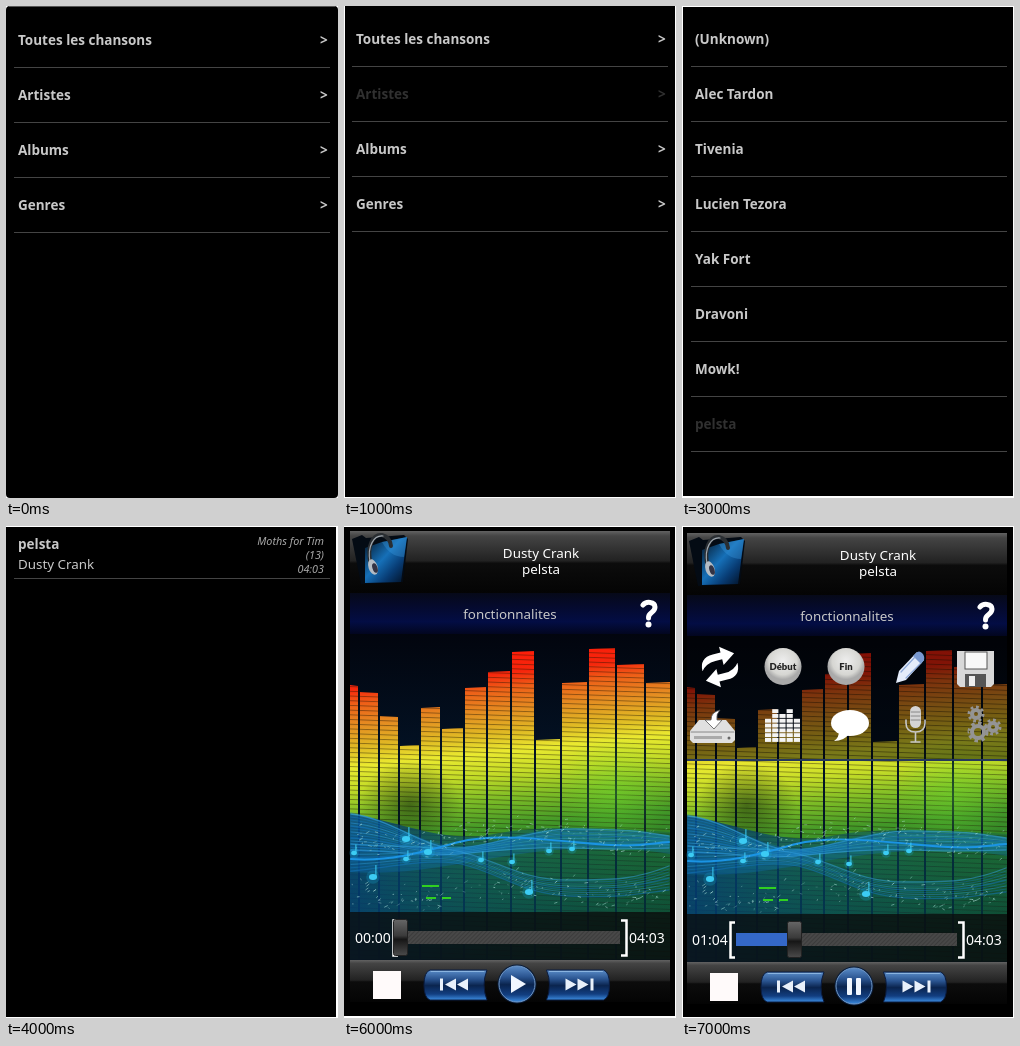
Write an HTML page that moves like this. It is 332 px wide and 492 px high and loops after 8000 ms.

```html
<!DOCTYPE html>
<html lang="fr">
<head>
<meta charset="utf-8">
<title>Lecteur audio</title>
<style>
html, body { margin: 0; width: 332px; height: 492px; overflow: hidden; background: #fff; }
svg { display: block; }
text { font: 13.4px "Noto Sans", "Open Sans", sans-serif; fill: #c8c8c8; white-space: pre; }
.b { font-weight: 700; font-size: 13.5px; }
.i { font-style: italic; font-size: 10.8px; text-anchor: end; fill: #a8a8a8; }
.w { fill: #fff; }
.t { fill: #fff; font-size: 14px; }
.m { text-anchor: middle; }
.k { font: 900 9.5px Lato, sans-serif; fill: #222; text-anchor: middle; }
.dim text { fill: #303030; }
.scene { visibility: hidden; animation: show 8s step-end infinite; }
@keyframes show { 0% { visibility: visible; } 12.5%, 100% { visibility: hidden; } }
</style>
</head>
<body>
<svg id="stage" width="332" height="492" viewBox="0 0 332 492">
  <defs>
    <linearGradient id="head" x2="0" y2="1">
      <stop stop-color="#626262"/><stop offset=".08" stop-color="#444"/><stop offset=".48" stop-color="#222"/>
      <stop offset=".52" stop-color="#0c0c0c"/><stop offset="1" stop-color="#040404"/>
    </linearGradient>
    <linearGradient id="navy" x2="0" y2="1">
      <stop stop-color="#060918"/><stop offset=".3" stop-color="#050a2c"/><stop offset=".7" stop-color="#030d44"/><stop offset="1" stop-color="#02061f"/>
    </linearGradient>
    <linearGradient id="sky" x2="0" y2="1">
      <stop stop-color="#02050e"/><stop offset=".4" stop-color="#031326"/><stop offset="1" stop-color="#04222a"/>
    </linearGradient>
    <linearGradient id="heat" gradientUnits="userSpaceOnUse" x1="150" y1="120" x2="182" y2="430">
      <stop stop-color="#ff1a08"/><stop offset=".09" stop-color="#f6260c"/><stop offset=".14" stop-color="#ee6018"/>
      <stop offset=".21" stop-color="#e48e22"/><stop offset=".28" stop-color="#e0ba24"/><stop offset=".34" stop-color="#eaea30"/>
      <stop offset=".41" stop-color="#c4dc28"/><stop offset=".49" stop-color="#7cbc26"/><stop offset=".58" stop-color="#429828"/>
      <stop offset=".7" stop-color="#267628"/><stop offset=".86" stop-color="#175a2c"/><stop offset="1" stop-color="#0e3c24"/>
    </linearGradient>
    <linearGradient id="deep">
      <stop stop-color="#043c74" stop-opacity=".85"/><stop offset=".4" stop-color="#04486c" stop-opacity=".55"/><stop offset="1" stop-color="#044c50" stop-opacity=".3"/>
    </linearGradient>
    <radialGradient id="smudge"><stop stop-color="#021408" stop-opacity=".5"/><stop offset="1" stop-color="#021408" stop-opacity="0"/></radialGradient>
    <radialGradient id="glow"><stop stop-color="#6be02c" stop-opacity=".35"/><stop offset="1" stop-color="#6be02c" stop-opacity="0"/></radialGradient>
    <linearGradient id="knob" x2="0" y2="1">
      <stop stop-color="#666"/><stop offset=".45" stop-color="#3a3a3a"/><stop offset=".55" stop-color="#161616"/><stop offset="1" stop-color="#4a4a4a"/>
    </linearGradient>
    <linearGradient id="btn" x2="0" y2="1">
      <stop stop-color="#5a8cc8"/><stop offset=".3" stop-color="#2a5490"/><stop offset=".52" stop-color="#0a244e"/><stop offset=".8" stop-color="#123e80"/><stop offset="1" stop-color="#3c8ce0"/>
    </linearGradient>
    <linearGradient id="folder" x2="1" y2="1"><stop stop-color="#04101e"/><stop offset=".45" stop-color="#1670b8"/><stop offset=".7" stop-color="#083c74"/><stop offset="1" stop-color="#020c1c"/></linearGradient>
    <radialGradient id="disc" cy=".35"><stop stop-color="#eee"/><stop offset=".75" stop-color="#d6d6d2"/><stop offset="1" stop-color="#aaa"/></radialGradient>
    <pattern id="lines" width="20" height="4.7" patternUnits="userSpaceOnUse" patternTransform="rotate(2)">
      <rect width="20" height="1" fill="#1c1400" opacity=".42"/>
    </pattern>
    <pattern id="hatch" width="3" height="3" patternUnits="userSpaceOnUse" patternTransform="rotate(45)">
      <rect width="3" height="3" fill="#484848"/><rect width="1" height="3" fill="#3c3c3c"/>
    </pattern>
  </defs>
</svg>
<script>
const ARTIST = 'pelsta', SONG = 'Dusty Crank';
const menu = ['Toutes les chansons', 'Artistes', 'Albums', 'Genres'];
const artists = ['(Unknown)', 'Alec Tardon', 'Tivenia', 'Lucien Tezora', 'Yak Fort', 'Dravoni', 'Mowk!', ARTIST];

const rect = (x, y, w, h, fill, more = '') => `<rect x="${x}" y="${y}" width="${w}" height="${h}" fill="${fill}" ${more}/>`;
const path = (d, more) => `<path d="${d}" ${more}/>`;
const circle = (x, y, r, fill, more = '') => `<circle cx="${x}" cy="${y}" r="${r}" fill="${fill}" ${more}/>`;
const ellipse = (x, y, rx, ry, fill, more = '') => `<ellipse cx="${x}" cy="${y}" rx="${rx}" ry="${ry}" fill="${fill}" ${more}/>`;
const text = (x, y, cls, s) => `<text x="${x}" y="${y}" class="${cls}">${s.replace('>', '&gt;')}</text>`;
const group = (s, more = '') => `<g ${more}>${s}</g>`;
const line = (c, w) => `fill="none" stroke="${c}" stroke-width="${w}" stroke-linecap="round" stroke-linejoin="round"`;
const range = n => [...Array(n).keys()];

function list(items, x, y, pressed, arrows) {
  return items.map((s, i) => group(
    text(x + 4, y + i * 55, 'b', s) + (arrows ? text(x + 306, y + i * 55, 'b', '>') : ''),
    i === pressed ? 'class="dim"' : '') + rect(x, y + 22 + i * 55, 316, 1, '#444')).join('');
}

function songRow(x, cls) {
  return group(text(x + 4, 23, 'b', ARTIST) + text(x + 4, 43, '', SONG) +
    ['Moths for Tim', '(13)', '04:03'].map((s, i) => text(x + 310, 19 + i * 14, 'i', s)).join(''), `class="${cls}"`) +
    rect(x, 52, 316, 1, '#444');
}

function random(seed) {
  return () => (seed = seed * 16807 % 2147483647) / 2147483647;
}

function waves() {
  const style = (i, n) => `${line(i % 3 ? '#1478c0' : '#34a4e4', i % 4 ? .8 : 1.3)} opacity="${n}"`;
  const upper = range(13).map(i => path(
    `M7 ${288 + i * 3}C50 ${293 + i * 2.6} 80 ${324 + i * .6} 115 ${322 + i * .5}S190 ${302 + i * 1.5} 235 ${303 + i * 1.6} 290 ${304 + i * 1.5} 325 ${310 + i}`,
    style(i, .6))).join('');
  const lower = range(9).map(i => path(
    `M7 ${318 + i * 3.4}C50 ${322 + i * 2.4} 90 ${318 + i * 1.5} 125 ${328 + i * 1.5}S180 ${354 + i * 1.7} 225 ${354 + i * 2} 290 ${354 + i * 1.8} 325 ${340 + i * 3}`,
    style(i, .5))).join('');
  return path('M6 286C50 294 80 322 120 320S180 300 235 303 295 306 326 310V328C250 316 190 326 150 332S60 350 6 346z', 'fill="#0f74bc" opacity=".3"') +
    upper + lower + path('M7 333C50 336 85 324 115 316S190 312 240 317 300 318 325 316', line('#1a94e4', 2));
}

function equalizer() {
  const rnd = random(77);
  const left = [6, 16, 36, 56, 77, 98, 121, 144, 168, 192, 218, 245, 273, 302, 328];
  const tops = [158, 165, 189, 219, 181, 202, 161, 145, 125, 213, 156, 122, 138, 156];
  const bars = tops.map((y, i) => {
    const w = Math.min(left[i + 1] - 2, 326) - left[i];
    const d = `M${left[i]} ${y + 1}l${w} ${i < 3 ? 1 : -1}V433h${-w}z`;
    return path(d, 'fill="url(#heat)"') + path(d, 'fill="url(#lines)"');
  }).join('');
  const specks = range(300).map(() => {
    const x = 8 + rnd() * 315, low = rnd() < .45;
    const y = (low ? 366 : 312) + 6 * Math.sin(x / 40) + (rnd() + rnd() - 1) * 18;
    return path(`M${x.toFixed(1)} ${y.toFixed(1)}l${(rnd() * 3).toFixed(1)} ${(rnd() * 3 - 2).toFixed(1)}`,
      `${line('#b4e8e0', .9)} opacity="${(.2 + rnd() * .5).toFixed(2)}"`);
  }).join('');
  const notes = [[29, 351], [10, 327], [62, 333], [84, 326], [137, 334], [168, 336], [185, 366], [205, 325], [228, 323], [62, 313]]
    .map(([x, y], i) => {
      const s = i % 3 ? 2.4 : 3.4;
      return circle(x, y, s * 2, '#20b8f0', 'opacity=".2"') + ellipse(x, y, s * 1.2, s * .9, '#3cccf4') +
        path(`M${x + s - .5} ${y}v${-s * 3.4}`, line('#3cccf4', 1));
    }).join('');
  return rect(6, 108, 320, 326, 'url(#sky)') + bars +
    ellipse(66, 278, 50, 44, 'url(#smudge)') + ellipse(270, 268, 56, 60, 'url(#glow)') +
    path('M6 288C60 296 100 318 150 308S270 302 326 306V434H6z', 'fill="url(#deep)"') +
    waves() + specks + notes +
    rect(78, 359, 17, 2, '#30d020') + rect(82, 371, 10, 2, '#30d020') + rect(98, 371, 9, 2, '#30d020');
}

function folderIcon() {
  return path('M8 13l10-4 4 3 38-3 4 4-5 43-42 2z', 'fill="#040b14"') +
    path('M21 22l17-6 25-5-6 45-36 1z', 'fill="url(#folder)"') +
    path('M38 16l25-5-3 20q-14 0-22-15z', 'fill="#3c9ce0" opacity=".35"') +
    path('M27 39C22 20 29 8 38 9Q46 11 47 20', line('#2a2e32', 4)) + path('M26 36C23 20 30 9 39 10', line('#a0a8b0', 1.2)) +
    ellipse(29, 41, 4.5, 8, '#b4bcc4', 'transform="rotate(-18 29 41)"') +
    ellipse(31, 42, 2.5, 5, '#334', 'transform="rotate(-18 31 42)"');
}

function skip(flip) {
  const d = 'M86 444H143Q137 459 143 474H86Q80 472 80 459T86 444z';
  const tri = x => `M${x} 458.500l11-6v12z`;
  return group(path(d, 'fill="url(#btn)" stroke="#0a1c40"') + path('M87 445.500H140', line('#8ab4e0', 1)) +
    rect(96, 452.500, 3, 12, '#e8f0fa') + path(tri(101) + tri(113), 'fill="#e8f0fa"'),
    flip ? 'transform="matrix(-1 0 0 1 345.500 0)"' : '');
}

function player(time, pos, playing) {
  const mark = playing
    ? rect(166, 450, 5, 17, '#f0f6ff', 'rx="1"') + rect(175, 450, 5, 17, '#f0f6ff', 'rx="1"')
    : path('M167 449l15 9-15 9z', 'fill="#f0f6ff"');
  return rect(6, 5, 320, 62, 'url(#head)') + folderIcon() +
    text(197, 32, 'w m', SONG) + text(197, 48, 'w m', ARTIST) +
    rect(6, 67, 320, 41, 'url(#navy)') + text(166, 93, 'm', 'fonctionnalites') +
    path('M299 79C302 75 311 75.500 311 81 311 87 304 86 304.500 92', line('#fff', 5)) + circle(304.500, 98.500, 3, '#fff') +
    equalizer() +
    rect(6, 386, 320, 48, '#0a0a0a', 'opacity=".75"') +
    text(11, 417, 't', time) + text(285, 417, 't', '04:03') +
    rect(55, 405, 221, 13, 'url(#hatch)') + rect(55, 405, Math.max(pos - 55, 0), 13, '#3468c8') +
    path('M54 394.500H49.500V429.500H54M277 394.500H282.500V429.500H277', 'fill="none" stroke="#fff" stroke-width="2.5"') +
    rect(pos, 393.500, 14, 36, 'url(#knob)', 'rx="2" stroke="#222"') +
    rect(6, 434, 320, 42, 'url(#head)') + rect(29, 445, 28, 28, '#fffafa') +
    skip() + circle(173, 458, 19.500, '#0a1c38') + circle(173, 458, 18, 'url(#btn)', 'stroke="#7098c8"') + mark + skip(true);
}

function gear(x, y, r) {
  return circle(x, y, r, 'none', 'stroke="#949494" stroke-width="4"') +
    circle(x, y, r + 3, 'none', 'stroke="#949494" stroke-width="3" pathLength="16" stroke-dasharray="1"');
}

function tools() {
  const loop = path('M20 141Q20 127 34 127H42V121L55 131 42 140V134H35Q25 134 20 141z', 'fill="#fff"');
  const disc = (x, s) => circle(x, 140.500, 18.500, 'url(#disc)') + text(x, 144, 'k', s);
  const pencil = path('M214 157l3-12 18-19 7 8-18 20z', 'fill="#e4ecfa"') +
    path('M231 130l8 8 3-4q1-4-2-7t-6 0z', 'fill="#7898d0"') + path('M219 146l14-15M224 152l14-14', line('#8ca8d8', 1.2));
  const floppy = path('M275 125h37v33l-3 3h-31l-3-3z', 'fill="#d8d8d8"') + rect(283, 126, 22, 17, '#f8f8f8', 'stroke="#555"') +
    rect(283, 148, 21, 13, '#555') + rect(287, 150, 6, 10, '#eee');
  const drive = path('M8 205l9-11h27l9 11v9l-3 3H11l-3-3z', 'fill="#e0e0e0"') + path('M9 206h43', line('#888', 1)) +
    rect(12, 210, 28, 3, '#aaa') + circle(47, 212, 1.5, '#666') +
    path('M38 184Q29 186 29 194H23L32 203 40 194H35Q34 188 38 184z', 'fill="#fff" stroke="#555" stroke-width=".8"');
  const blocks = [5, 7, 6, 7, 5].map((n, i) => range(n).map(j => rect(83 + i * 7.2, 212 - j * 4.8, 6.2, 3.9, '#f4f4f4')).join('')).join('');
  const bubble = ellipse(168, 197, 19, 13, '#fff') + path('M157 205q0 7-5 10 10 0 15-7z', 'fill="#fff"');
  const mic = rect(228, 180, 11, 22, '#d4d4d4', 'rx="5.5"') + path('M229 186h9M229 190h9M229 194h9', line('#888', 1)) +
    path('M224 194v3q0 9 9.500 9t9.500-9v-3M233.500 206v9M229 216h9', line('#c8c8c8', 1.6));
  return rect(5, 110, 320, 124, '#000', 'opacity=".48"') + rect(5, 233, 320, 2, '#26385c') +
    group(loop + group(loop, 'transform="rotate(180 38 141)"'), 'transform="rotate(-14 38 141)"') +
    disc(101, 'Début') + disc(164, 'Fin') + pencil + floppy +
    drive + blocks + bubble + mic + gear(294, 188, 4) + gear(296, 206, 6) + gear(311, 201, 4);
}

const scenes = [
  rect(0, 0, 332, 492, '#000', 'rx="4"') + rect(3, 0, 326, 1, '#555') + list(menu, 8, 39, -1, true),
  rect(1, 0, 330, 491, '#000') + list(menu, 8, 38, 1, true),
  rect(1, 0, 330, 491, '#000') + list(artists, 8, 38),
  rect(1, 1, 330, 489, '#000') + list(artists, 9, 38, 7),
  rect(0, 1, 330, 490, '#000') + songRow(8, ''),
  rect(1, 1, 330, 489, '#000') + songRow(9, 'dim'),
  rect(0, 1, 331, 489, '#000') + player('00:00', 49.5, false),
  rect(1, 1, 330, 490, '#000') + group(player('01:04', 106.5, true), 'transform="translate(-1 2)"') + tools()
];

document.getElementById('stage').insertAdjacentHTML('beforeend', scenes.map((s, i) =>
  group(s, `class="scene" style="animation-delay:${i - scenes.length}s"`)).join(''));
</script>
</body>
</html>
```
